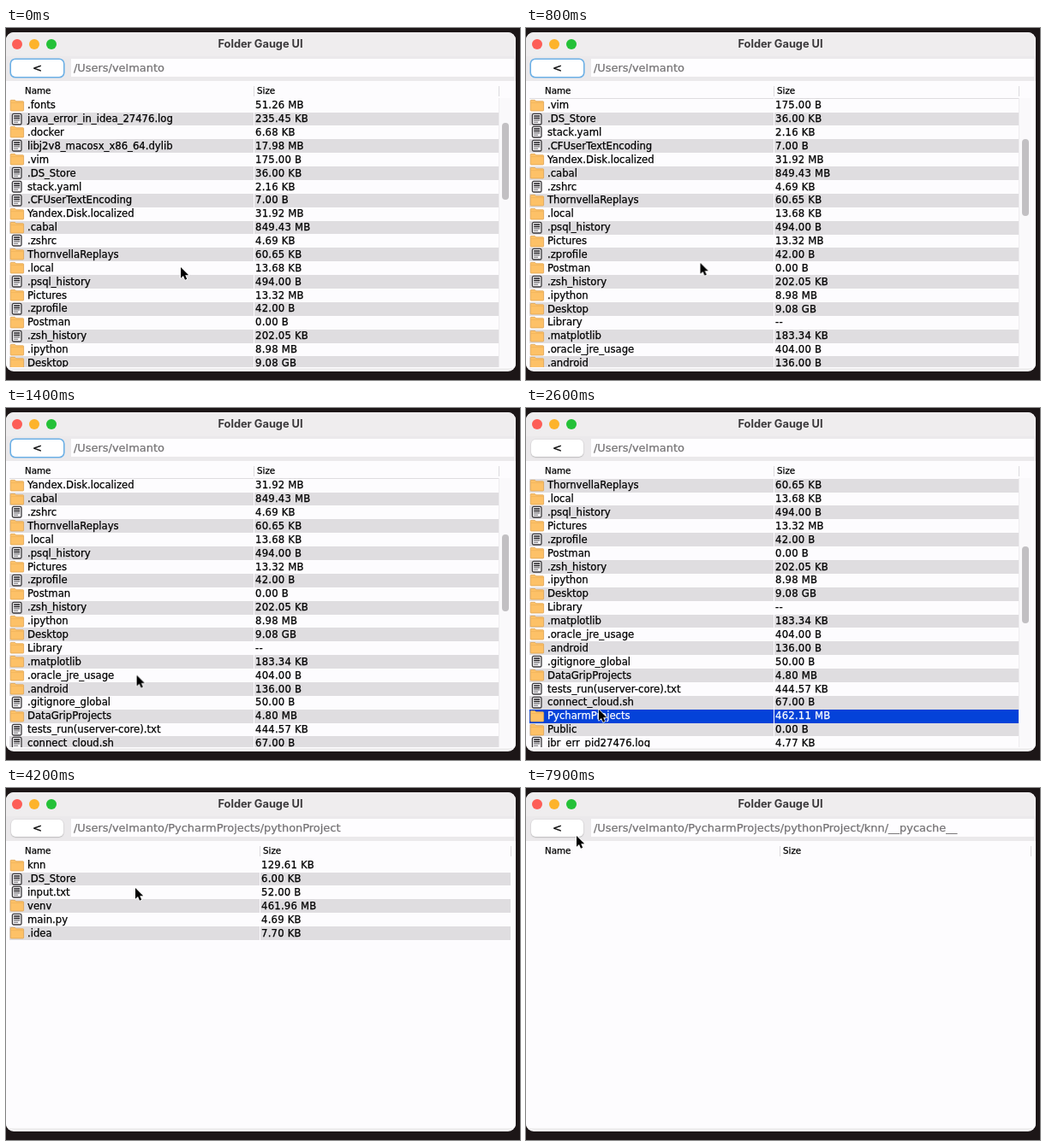
An HTML page for the animation above (8000 ms loop, 600x412 px).

```html
<!DOCTYPE html>
<html lang="en">
<head>
<meta charset="utf-8">
<title>Folder Gauge UI</title>
<style>
  html, body { margin: 0; width: 100%; height: 100%; overflow: hidden; background: #1c1617; }
  body { --row: 15.88px; --loop: 8000ms; }
  #stage { position: relative; width: 600px; height: 412px; overflow: hidden;
    font: 11.65px/15.88px "DejaVu Sans", sans-serif; color: #000; white-space: pre; -webkit-text-stroke: .25px; }
  #stage div, #stage span, #stage svg, #stage i { position: absolute; display: block; }

  #win { left: 0; top: 5px; width: 595px; height: 397px; border-radius: 9px; overflow: hidden; background: #f1f0f1; }
  #bar { left: 0; top: 0; width: 595px; height: 28px; background: #efedee; }
  #bar i { top: 7.7px; width: 12.4px; height: 12.4px; border-radius: 50%; }
  #bar span { left: 0; width: 594px; top: 5px; text-align: center; color: #3b393b;
    font: 700 12.8px/18px Inter, sans-serif; -webkit-text-stroke: 0; }
  #tools { left: 0; top: 28px; width: 595px; height: 29px; background: #ebe9eb; }
  #body { left: 0; top: 57px; width: 595px; height: 336px; background: #fdfcfe; }
  #field { left: 76px; top: 3px; width: 517px; height: 21px; background: #fefdff; }
  #back { left: 6px; top: 4px; width: 61px; height: 20px; border-radius: 5px; background: #fff;
    text-align: center; font-size: 13px; line-height: 20px; -webkit-text-stroke: .4px;
    box-shadow: 0 0 0 1.6px #6cb0e6; animation: unfocus var(--loop) step-end infinite; }

  .view { left: 0; top: 0; width: 595px; height: 402px; visibility: hidden;
    animation: var(--loop) step-end infinite; }
  .path { left: 79px; top: 38px; font-size: 12.95px; line-height: 18px; color: #747274; }
  .head { top: 65px; font-size: 10.3px; line-height: 16px; }
  .rule { top: 68px; width: 1px; height: 12px; background: #dcdade; }
  .list { left: 4px; top: 82px; height: 315px; overflow: hidden; }
  .rows { left: 0; top: .7px; width: 100%; }
  .row { left: 0; width: 100%; height: var(--row); }
  .row:nth-child(even) { background: #dfdde0; }
  .row svg { left: 0; top: 0; }
  .row span { top: .6px; }
  .name { left: 21px; }
  .size { letter-spacing: .22px; }
  .gap { top: 0; width: 1px; height: 100%; background: #fdfcfe; }
  .thumb { left: 579px; top: 111px; width: 8px; height: 90px; border-radius: 4px; background: #c2c0c3; }
  .track { left: 575px; top: 82px; width: 15px; height: 315px; background: #faf9fb; border-left: 1px solid #eeecef; box-sizing: border-box; }

  .sel { animation: var(--loop) step-end infinite; }
  #home { animation-name: home; }
  #home .rows { animation: scroll var(--loop) infinite; }
  #home .thumb { animation: thumb var(--loop) infinite; }
  #home .sel { animation-name: pick1; }
  #projects { animation-name: projects; }
  #projects .sel { animation-name: pick2; }
  #python { animation-name: python; }
  #python .sel { animation-name: pick3; }
  #knn { animation-name: knn; }
  #knn .sel { animation-name: pick4; }
  #cache { animation-name: cache; }
  .late { animation: late var(--loop) step-end infinite; }
  .wait { animation: wait var(--loop) step-end infinite; }

  @keyframes unfocus { 31.25%, 100% { box-shadow: 0 .5px 1.5px #0005; } }
  @keyframes home { 0% { visibility: visible; } 33.75%, 100% { visibility: hidden; } }
  @keyframes projects { 33.75% { visibility: visible; } 46.25%, 100% { visibility: hidden; } }
  @keyframes python { 46.25% { visibility: visible; } 72.5%, 100% { visibility: hidden; } }
  @keyframes knn { 72.5% { visibility: visible; } 90%, 100% { visibility: hidden; } }
  @keyframes cache { 90%, 100% { visibility: visible; } }
  @keyframes pick1 { 31.25%, 100% { background: #0442d9; color: #fff; } }
  @keyframes pick2 { 43.75%, 100% { background: #0442d9; color: #fff; } }
  @keyframes pick3 { 71.25%, 100% { background: #0442d9; color: #fff; } }
  @keyframes pick4 { 87.5%, 100% { background: #0442d9; color: #fff; } }
  @keyframes late { 0% { opacity: 0; } 50%, 100% { opacity: 1; } }
  @keyframes wait { 0% { opacity: 1; } 50%, 100% { opacity: 0; } }
  /* Animating top keeps the text crisp. */
  @keyframes scroll {
    0% { top: .7px; animation-timing-function: steps(3); }
    6.25% { top: calc(var(--row) * -3 + .7px); animation-timing-function: steps(3); }
    13.75% { top: calc(var(--row) * -6 + .7px); animation-timing-function: steps(5); }
    21.25%, 100% { top: calc(var(--row) * -11 + .7px); }
  }
  @keyframes thumb {
    0% { top: 111px; animation-timing-function: steps(3); }
    6.25% { top: 125px; animation-timing-function: steps(3); }
    13.75% { top: 139px; animation-timing-function: steps(5); }
    21.25%, 100% { top: 162px; }
  }

  /* The pointer moves ten times a second. */
  #cursor { left: 0; top: 0; animation: point var(--loop) infinite; }
  @keyframes point {
    0% { transform: translate(204px, 280px); animation-timing-function: steps(5); }
    6.25% { transform: translate(207.5px, 275px); animation-timing-function: steps(6); }
    13.75% { transform: translate(199.5px, 275px); animation-timing-function: steps(7); }
    22.5% { transform: translate(90px, 363px); animation-timing-function: steps(5); }
    28.75%, 37.5% { transform: translate(85px, 353px); animation-timing-function: steps(4); }
    42.5%, 46.25% { transform: translate(112px, 104px); animation-timing-function: steps(5); }
    52.5% { transform: translate(151px, 117px); animation-timing-function: steps(5); }
    58.75% { transform: translate(109px, 146px); animation-timing-function: steps(9); }
    70% { transform: translate(98px, 89px); animation-timing-function: steps(4); }
    75% { transform: translate(98px, 87px); animation-timing-function: steps(9); }
    86.25% { transform: translate(104px, 156px); animation-timing-function: steps(5); }
    92.5% { transform: translate(104px, 157px); animation-timing-function: steps(5); }
    98.75%, 100% { transform: translate(59px, 56px); }
  }
</style>
</head>
<body>
<svg width="0" height="0" style="position:absolute">
  <symbol id="folder" viewBox="0 0 18 16">
    <path d="M1.2 2.2q0-.8.8-.8h4.4l1.4 1.4h8q.8 0 .8.8v9.6q0 .8-.8.8H2q-.8 0-.8-.8z" fill="#fdc167" stroke="#dfa250" stroke-width=".8"/>
    <path d="M1.6 4.6h14.6" stroke="#f0b25a" stroke-width=".7"/>
  </symbol>
  <symbol id="file" viewBox="0 0 18 16">
    <rect x="3.4" y="1.4" width="10.6" height="12.6" rx="1.6" fill="#f3f2f4" stroke="#3b393c" stroke-width="1.3"/>
    <path d="M5.2 4.1h7M5.2 6.4h7" stroke="#1f1d20" stroke-width="1.5"/>
    <path d="M5.2 8.9h7M5.2 11.3h4.8" stroke="#757377" stroke-width="1.1"/>
  </symbol>
</svg>
<div id="stage">
  <div id="win">
    <div id="bar">
      <i style="left:6.8px;background:#fd5e57"></i>
      <i style="left:26.8px;background:#fdb32b"></i>
      <i style="left:46.8px;background:#24c138"></i>
      <span>Folder Gauge UI</span>
    </div>
    <div id="tools"><div id="back">&lt;</div><div id="field"></div></div>
    <div id="body"></div>
  </div>
  <svg id="cursor" width="16" height="22" overflow="visible">
    <path d="M0 0V12.8L3 10.1 5 14.8 7.2 13.8 5.2 9.3H9.2Z" fill="#000" stroke="#fff" stroke-width="1.4" paint-order="stroke" stroke-linejoin="round"/>
  </svg>
</div>
<script>
  // A trailing slash marks a folder, a leading * the row to be picked, ? a size that arrives late.
  const home = `.fonts/|51.26 MB
java_error_in_idea_27476.log|235.45 KB
.docker/|6.68 KB
libj2v8_macosx_x86_64.dylib|17.98 MB
.vim/|175.00 B
.DS_Store|36.00 KB
stack.yaml|2.16 KB
.CFUserTextEncoding|7.00 B
Yandex.Disk.localized/|31.92 MB
.cabal/|849.43 MB
.zshrc|4.69 KB
ThornvellaReplays/|60.65 KB
.local/|13.68 KB
.psql_history|494.00 B
Pictures/|13.32 MB
.zprofile|42.00 B
Postman/|0.00 B
.zsh_history|202.05 KB
.ipython/|8.98 MB
Desktop/|9.08 GB
Library/|--
.matplotlib/|183.34 KB
.oracle_jre_usage/|404.00 B
.android/|136.00 B
.gitignore_global|50.00 B
DataGripProjects/|4.80 MB
tests_run(userver-core).txt|444.57 KB
connect_cloud.sh|67.00 B
*PycharmProjects/|462.11 MB
Public/|0.00 B
jbr_err_pid27476.log|4.77 KB`;
  const projects = `.DS_Store|6.00 KB
*pythonProject/|462.11 MB`;
  const python = `*knn/|129.61 KB
.DS_Store|6.00 KB
input.txt|52.00 B
venv/|?461.96 MB
main.py|4.69 KB
.idea/|7.70 KB`;
  const knn = `zefa|106.97 KB
.DS_Store|6.00 KB
kernel.py|1.08 KB
KNeighborsClassifier.py|5.33 KB
*__pycache__/|0.00 B
distance.py|244.00 B
input.txt|108.00 B
zefa.cpp|6.45 KB
main.py|671.00 B
Archive.zip|2.78 KB`;

  const stage = document.getElementById('stage');
  const cursor = document.getElementById('cursor');

  function rowHtml(line, i, split) {
    const [label, size] = line.split('|');
    const picked = label[0] === '*';
    const icon = label.endsWith('/') ? 'folder' : 'file';
    const cell = (text, cls = '') => `<span class="size ${cls}" style="left:${split - 2}px">${text}</span>`;
    const sizes = size[0] === '?' ? cell('--', 'wait') + cell(size.slice(1), 'late') : cell(size);
    return `<div class="row${picked ? ' sel' : ''}" style="top:calc(var(--row) * ${i})">` +
      `<svg width="18" height="16"><use href="#${icon}"/></svg>` +
      `<span class="name">${label.replace(/[*\/]/g, '')}</span>` +
      `<i class="gap" style="left:${split - 4}px"></i>${sizes}</div>`;
  }

  function addView(id, path, text, long) {
    const split = long ? 289 : 296, edge = long ? 575 : 589;
    const rows = text ? text.split('\n').map((line, i) => rowHtml(line, i, split)).join('') : '';
    const view = document.createElement('div');
    view.id = id;
    view.className = 'view';
    view.innerHTML = `<span class="path">/Users/velmanto${path}</span>` +
      `<span class="head" style="left:22px">Name</span>` +
      `<span class="head" style="left:${split + 4}px">Size</span>` +
      `<i class="rule" style="left:${split}px"></i><i class="rule" style="left:${edge}px"></i>` +
      `<div class="list" style="width:${edge - 4}px"><div class="rows">${rows}</div></div>` +
      (long ? '<div class="track"></div><div class="thumb"></div>' : '');
    stage.insertBefore(view, cursor);
  }

  addView('home', '', home, true);
  addView('projects', '/PycharmProjects', projects);
  addView('python', '/PycharmProjects/pythonProject', python);
  addView('knn', '/PycharmProjects/pythonProject/knn', knn);
  addView('cache', '/PycharmProjects/pythonProject/knn/__pycache__', '');
</script>
</body>
</html>
```
